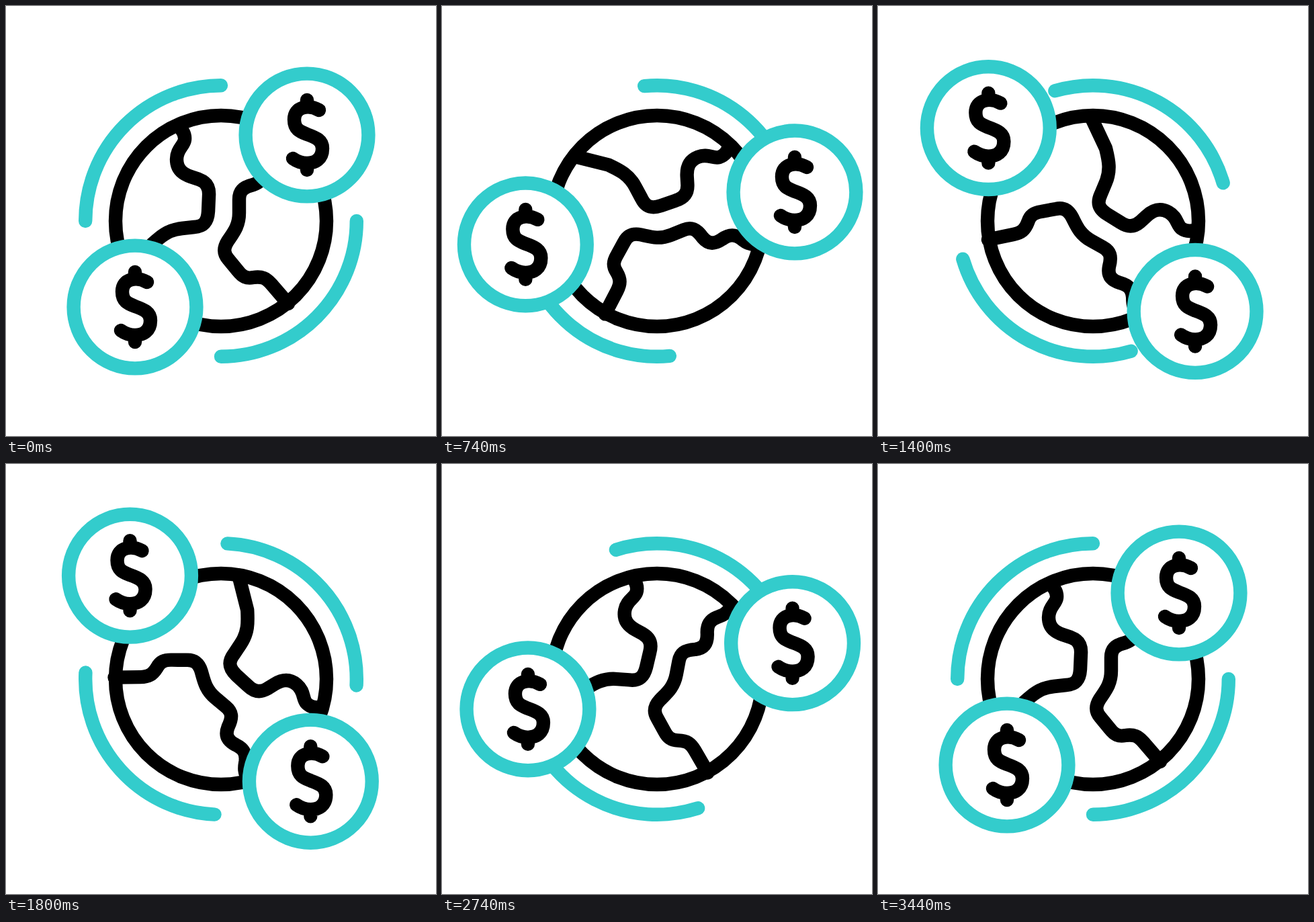
An HTML page that plays this animation: 640x640 px, repeating every 3600 ms.

```html
<!DOCTYPE html>
<html lang="en">
<head>
<meta charset="utf-8">
<title>Money around the globe</title>
<style>
  html, body { margin: 0; width: 100%; height: 100%; overflow: hidden; background: #fff; }
  svg { display: block; width: 100vw; height: 100vh; }
  path, circle { fill: none; stroke-width: 20.4; stroke-linecap: round; stroke-linejoin: round; }
  .ink { stroke: #000; }
  .teal { stroke: #33cccc; }
  .disc { fill: #fff; }
</style>
</head>
<body>
<svg viewBox="0 0 640 640">
  <defs>
    <g id="coin">
      <circle class="teal disc" r="91.4"/>
      <path class="ink" d="M18-37C2-46-19-42-19-23C-19-8-10-5 0-1C14 4 23 8 23 20C23 36 12 42 0 42C-8 42-14 40-21 35M0-52V-42M0 42V52"/>
    </g>
  </defs>
  <g id="globe" class="ink">
    <path d="M256 178C262 184 267 190 266 199C265 208 254 213 254 228C254 243 263 250 275 254L287 258C298 262 303 270 302 283L301 306C300 322 294 328 280 329L262 331C240 333 228 345 216 356L185 399"/>
    <path d="M409 191C405 205 398 209 391 213C380 220 378 228 381 240C384 254 380 262 368 266C352 270 347 276 347 288L347 308C347 328 338 338 330 350C323 361 324 369 331 377L345 394C352 403 358 406 368 404C381 402 387 405 395 414L420 443"/>
  </g>
  <circle class="ink" cx="320" cy="320" r="157"/>
  <g id="arcs" class="teal">
    <path d="M118.2 320A201.8 201.8 0 0 1 320 118.2"/>
    <path d="M521.8 320A201.8 201.8 0 0 1 320 521.8"/>
  </g>
  <use id="coinA" href="#coin"/>
  <use id="coinB" href="#coin"/>
</svg>
<script>
const LOOP = 3600, STEP = 20, START = 200, TURN = 1680, END = 3400;

// Cubic ease from (0,0) to (1,1) with level handles at x1 and x2
function ease(x1, x2) {
  return x => {
    if (x <= 0) return 0;
    if (x >= 1) return 1;
    let lo = 0, hi = 1, s = 0.5;
    for (let i = 0; i < 30; i++) {
      s = (lo + hi) / 2;
      const v = 3 * (1 - s) * (1 - s) * s * x1 + 3 * (1 - s) * s * s * x2 + s * s * s;
      if (v < x) lo = s; else hi = s;
    }
    return s * s * (3 - 2 * s);
  };
}

// Value going a -> b -> c over the two halves of the motion
function swing(a, b, c, out, back) {
  return t => t < TURN
    ? a + (b - a) * out((t - START) / (TURN - START))
    : b + (c - b) * back((t - TURN) / (END - TURN));
}

function route(d) {
  const p = document.createElementNS("http://www.w3.org/2000/svg", "path");
  p.setAttribute("d", d);
  const len = p.getTotalLength();
  return k => p.getPointAtLength(k * len);
}

const $ = id => document.getElementById(id);
const coinEase = ease(0.24, 0.7);
const coinPos = swing(0, 1, 0, coinEase, coinEase);
const arcTurn = swing(0, 280, 0, ease(0.333, 0.667), ease(0.227, 0.605));
const globeTurn = swing(0, 492, 360, ease(0.784, 0.23), ease(0.36, 0.076));

// Coin routes, measured from the centre of the globe
const routeA = route("M128-128C172-118 210.5-62 210.5-5C210.5 42 177 122 127 157");
const routeB = route("M-128 128C-168 105-205 40-205-20C-205-80-186-122-129-158");

const spin = (el, a) => el.setAttribute("transform", `rotate(${a} 320 320)`);
const place = (el, p) => el.setAttribute("transform", `translate(${320 + p.x} ${320 + p.y})`);

function draw(ms) {
  const t = Math.floor((ms % LOOP) / STEP) * STEP;
  const k = coinPos(t);
  spin($("globe"), globeTurn(t));
  spin($("arcs"), arcTurn(t));
  place($("coinA"), routeA(k));
  place($("coinB"), routeB(k));
}

const begin = performance.now();
function tick() {
  draw(performance.now() - begin);
  requestAnimationFrame(tick);
}
tick();
</script>
</body>
</html>
```
